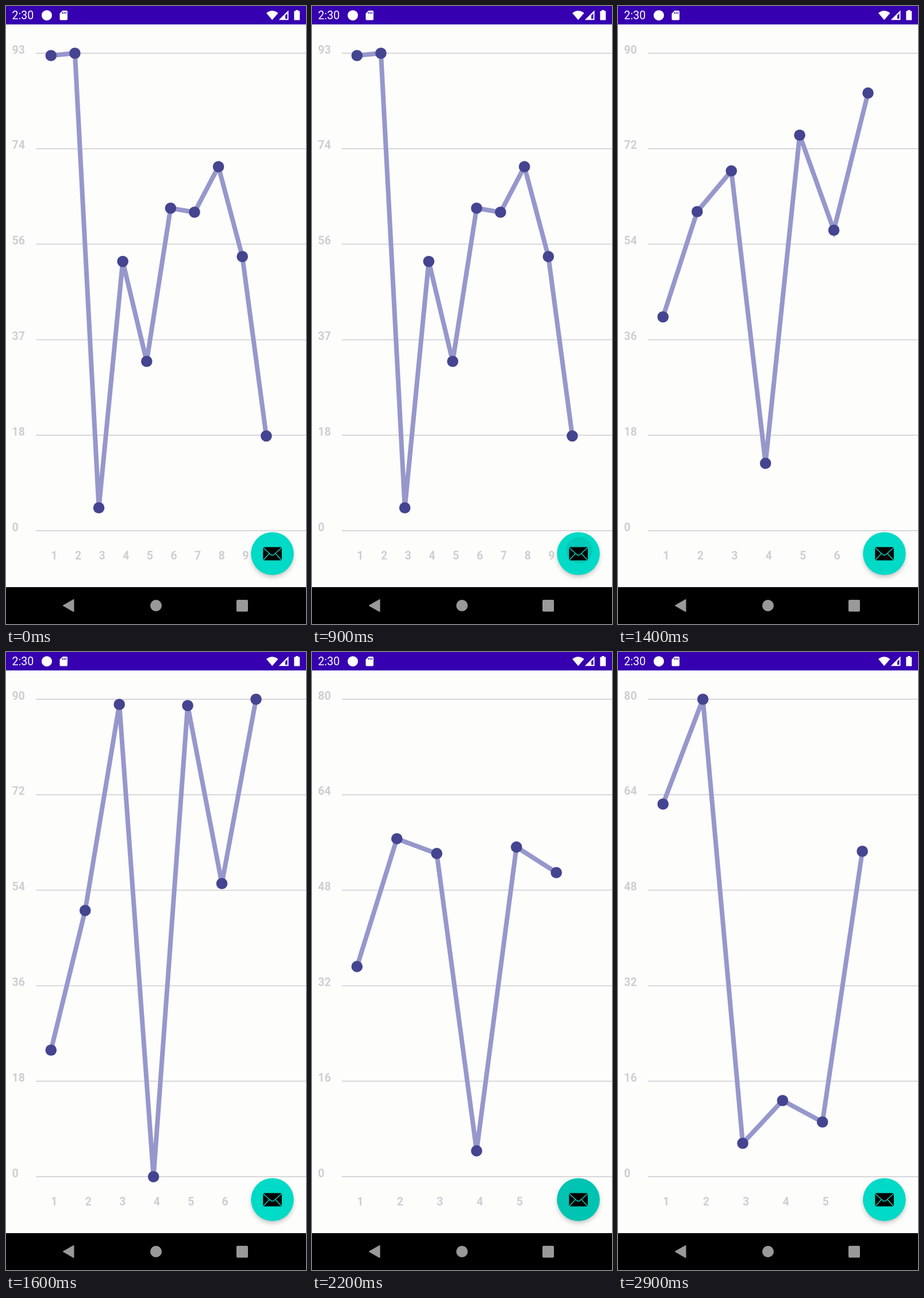
An HTML page that plays this animation: 522x1073 px, repeating every 3 s.

```html
<!DOCTYPE html>
<html lang="en">
<head>
<meta charset="utf-8">
<title>Animated line chart</title>
<style>
  html, body { margin: 0; width: 100%; height: 100%; overflow: hidden; background: #fdfdfc; }
  svg { display: block; width: 100vw; height: 100vh; }
  text { font-family: Roboto, sans-serif; font-size: 19.5px; }
  #yLabels, #xLabels { fill: #cfcfd2; }
  #yLabels text, #xLabels text { font-weight: 700; }
</style>
</head>
<body>
<svg viewBox="0 0 522 1073">
  <defs>
    <filter id="blur" x="-50%" y="-50%" width="200%" height="200%">
      <feGaussianBlur id="blurAmount" stdDeviation="4"/>
    </filter>
    <clipPath id="fabClip"><circle cx="463.5" cy="950.8" r="37.3"/></clipPath>
  </defs>
  <rect width="522" height="1073" fill="#fdfdfc"/>

  <g id="grid" stroke="#cdcdd1" stroke-width="1.5"></g>
  <g id="yLabels"></g>
  <g id="xLabels"></g>
  <path id="line" fill="none" stroke="#9697cb" stroke-width="8"/>
  <g id="dots" fill="#444490"></g>

  <!-- floating button -->
  <circle id="shadow" cx="463.5" cy="955" r="36" filter="url(#blur)"/>
  <circle id="fab" cx="463.5" cy="950.8" r="37.3" fill="#00dac6"/>
  <circle id="ripple" cx="465" cy="945" r="23" clip-path="url(#fabClip)"/>
  <rect x="447.3" y="939.6" width="32.6" height="23" rx="2"/>
  <path id="flap" d="M447.5 940.5L460.5 952.3Q463.5 954.8 466.5 952.3L479.7 940.5M448 961.8L458.2 950.8M479.2 961.8L468.9 950.8"
    fill="none" stroke-width="1.5"/>

  <!-- status bar -->
  <rect width="522" height="32" fill="#3600b0"/>
  <g fill="#fff">
    <text x="10.5" y="23">2:30</text>
    <circle cx="71" cy="16.2" r="9"/>
    <path d="M98.5 8H105.3Q107 8 107 9.700V22.800Q107 24.500 105.300 24.500H95.200Q93.500 24.500 93.500 22.800V13Z"/>
    <path d="M453 12.300Q463 4 473.500 12.300L463.200 24.300Z"/>
    <path fill-rule="evenodd" d="M491.500 7.500V24.300H474.700ZM489.500 13V22.300H486V16.300Z"/>
    <path d="M504 7H508.500V8.800H511.200V24.500H501.300V8.800H504Z"/>
  </g>
  <path d="M98.300 10.500V13.500M101.300 10.500V13.500M104.300 10.500V13.500" stroke="#3600b0" stroke-width="1.500"/>

  <!-- navigation bar -->
  <rect y="1009" width="522" height="64"/>
  <g fill="#999">
    <path d="M100 1041L117.500 1031V1051Z" stroke="#999" stroke-width="2" stroke-linejoin="round"/>
    <circle cx="261" cy="1041" r="10"/>
    <rect x="401" y="1031" width="20" height="20.500" rx="2"/>
  </g>
</svg>
<script>
const LOOP = 3000, STEP = 100;
const TOP = 82, GAP = 165.8, LEFT = 78.3, SPAN = 416.2;
const $ = id => document.getElementById(id);

// Each series holds pixel heights; it grows out of the previous one.
const series = [
  { start: -1000, press: -1000, duration: 1, ticks: [93, 74, 56, 37, 18, 0],
    ys: [86, 82, 871.3, 443.5, 617, 351, 358, 279, 435, 746.5] },
  { start: 900, press: 900, duration: 667, ticks: [90, 72, 54, 36, 18, 0],
    ys: [691.3, 448.8, 91, 911, 93, 402, 82] },
  { start: 1917, press: 1900, duration: 833, ticks: [80, 64, 48, 32, 16, 0],
    ys: [264, 82, 853, 778.8, 816, 346] }
];

const set = (el, attrs) => {
  for (const key in attrs) el.setAttribute(key, attrs[key]);
};

function add(parent, tag, attrs, content = "") {
  const el = document.createElementNS("http://www.w3.org/2000/svg", tag);
  set(el, attrs);
  el.textContent = content;
  parent.append(el);
}

for (let i = 0; i < 6; i++) {
  const y = TOP + i * GAP;
  add($("grid"), "line", { x1: 52, x2: 522, y1: y, y2: y });
}

function drawLabels(data) {
  $("yLabels").replaceChildren();
  $("xLabels").replaceChildren();
  data.ticks.forEach((tick, i) =>
    add($("yLabels"), "text", { x: 10.5, y: TOP + i * GAP + 0.6 }, tick));
  data.ys.forEach((_, i) =>
    add($("xLabels"), "text", { x: LEFT + i * SPAN / data.ys.length, y: 961 }, i + 1));
}

function drawChart(index, time) {
  const { start, duration, ys } = series[index];
  const previous = index ? series[index - 1].ys : ys;
  const progress = Math.min(1, (time - start) / duration);
  const points = ys.map((y, i) => [
    LEFT + i * SPAN / ys.length,
    previous[i] + (y - previous[i]) * progress
  ]);
  $("line").setAttribute("d", "M" + points.join("L"));
  $("dots").replaceChildren();
  for (const [cx, cy] of points) add($("dots"), "circle", { cx, cy, r: 9.8 });
}

function drawButton(time) {
  const press = series.map(s => s.press).filter(p => p <= time).pop();
  const age = time - press;
  const growing = age < 100;
  const fade = growing ? 0.07 : Math.max(0, Math.min(0.245, 0.245 - (age - 100) * 0.00072));
  const raised = age >= 100 && age < 200;
  set($("ripple"), { r: growing ? 23 : 60, "fill-opacity": age < 400 ? fade : 0 });
  set($("shadow"), { cy: raised ? 959 : 955, "fill-opacity": raised ? 0.3 : 0.26 });
  $("blurAmount").setAttribute("stdDeviation", raised ? 6 : 4);
  $("flap").setAttribute("stroke", raised ? "#00a594" : "#00d0bd");
}

let shown = -1;

function render(now) {
  const time = Math.floor(now % LOOP / STEP) * STEP;
  const index = series.findLastIndex(s => s.start < time || s.start < 0);
  if (index !== shown) drawLabels(series[shown = index]);
  drawChart(index, time);
  drawButton(time);
}

const origin = performance.now();
function tick() {
  render(performance.now() - origin);
  requestAnimationFrame(tick);
}
tick();
</script>
</body>
</html>
```
